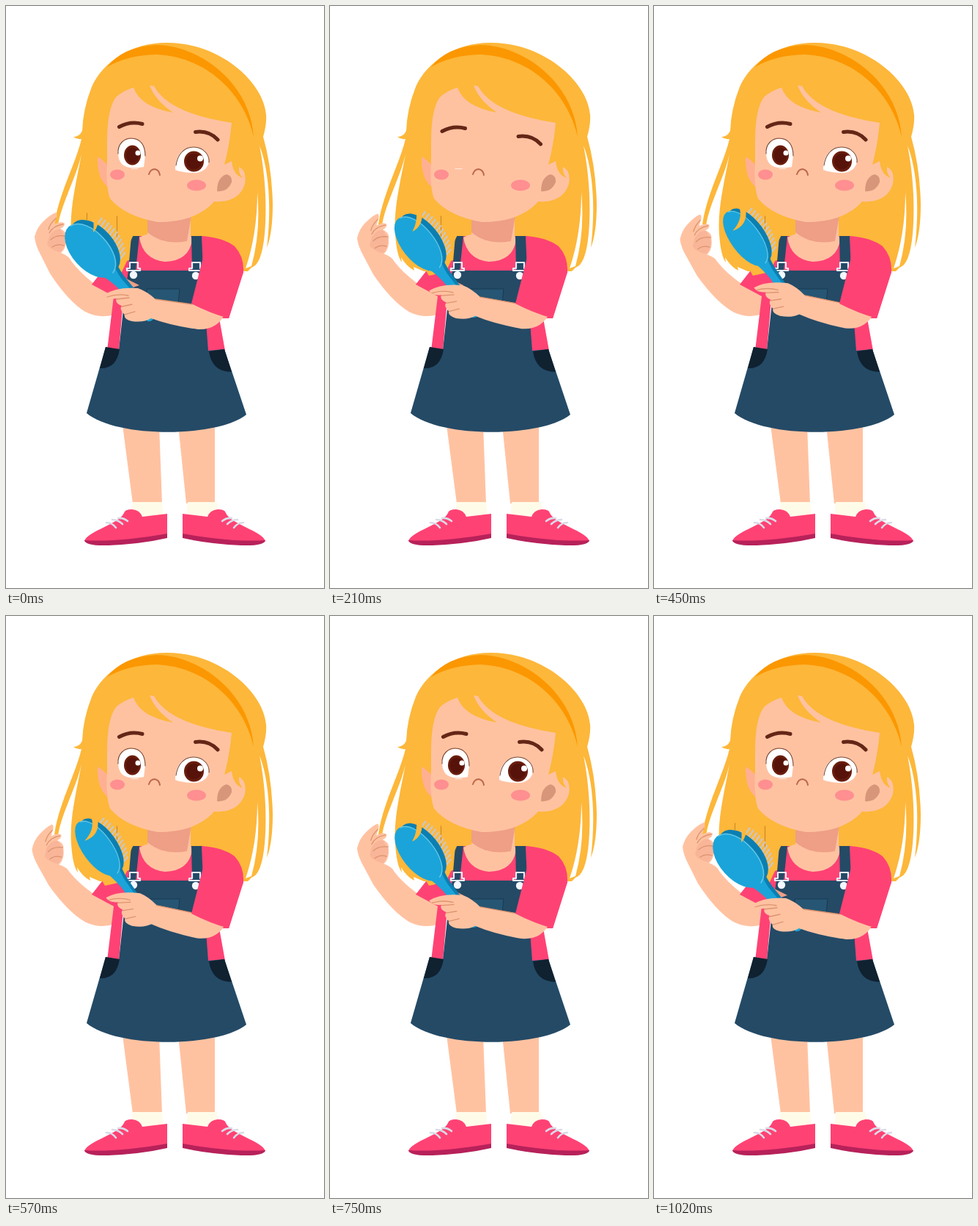
An HTML page that plays this animation: 434 by 792 pixels, repeating every 1050 ms.

```html
<!DOCTYPE html>
<html lang="en">
<head>
<meta charset="utf-8">
<title>Girl brushing her hair</title>
<style>
html, body { margin: 0; height: 100%; overflow: hidden; background: #fff; }
svg { display: block; width: 434px; height: 792px; }
.hair { fill: #fdb73a; }
.band { fill: #fb9700; }
.skin { fill: #ffc2a1; }
.shade { fill: #ee9f86; }
.pink { fill: #ff4274; }
.sole { fill: #b7215a; }
.dress { fill: #244a66; }
.dark { fill: #102130; }
.sock { fill: #fffbe9; }
.blue { fill: #1ba4d9; }
.navy { fill: #0b7fb2; }
.white { fill: #fff; }
.iris { fill: #6a1d0d; }
.pupil { fill: #57130a; }
.cheek { fill: #ff8f90; }
.line { fill: none; stroke-linecap: round; stroke-linejoin: round; }
.crease { stroke: #dc946f; stroke-width: 1.3; }
.brow { stroke: #642616; stroke-width: 5; }
.lid { stroke: #7a4a38; stroke-width: 1.1; }
.buckle { stroke: #e3eefa; stroke-width: 2.2; }
.lace { stroke: #d9dbe8; stroke-width: 2.6; }
</style>
</head>
<body>
<svg viewBox="0 0 434 792">
  <defs>
    <g id="shoe">
      <path class="sock" d="M173 675H213L215 694H170Z"/>
      <path class="pink" d="M220 691L186 695Q183 686 172 685Q162 685 161 690C153 706 112 714 107 728L150 731L220 721Z"/>
      <path class="sole" d="M107 727Q150 730 220 718V724Q185 732 140 734Q108 735 107 727Z"/>
      <path class="line lace" d="M153 697Q160 696 166 701M145 699Q153 699 159 705M137 703Q145 703 150 710"/>
    </g>
  </defs>

  <!-- back hair and loose strands -->
  <path class="hair" d="M218 50C172 50 132 76 117 110Q105 140 104 170Q100 178 92 178Q97 182 103 181C95 215 72 255 66 297L71 298C77 262 102 225 106 184C100 225 86 270 89 310Q91 340 98 349L97 342Q105 355 115 360L114 355L128 361H330L335 356Q349 352 353 310C357 265 352 220 346 190C358 220 363 270 356 329Q364 308 364 270Q363 220 351 178Q356 160 355 148C352 104 292 49 218 50Z"/>
  <path class="white" d="M343 253Q343 310 327 357L335 354Q348 307 343 253Z"/>

  <g id="leftArm">
    <path class="skin" d="M47 338Q40 325 39 314Q42 302 50 294Q60 284 68 281Q71 284 68 290L66 297Q76 292 80 296Q80 301 74 303Q83 307 82 314Q83 326 78 333L75 336Q86 340 89 347Q100 362 118 376L150 388L147 420Q128 426 108 416Q85 402 60 364Z"/>
    <path class="shade" opacity=".35" d="M59 313Q66 302 75 304L81 315Q82 327 74 335Q60 332 56 324Z"/>
    <path class="line crease" d="M68 289Q60 296 58 304M78 297Q64 299 59 309M81 313Q68 311 61 318M79 326Q70 323 63 328"/>
  </g>

  <path class="skin" d="M159 570H209L213 677H173ZM235 570H285V677H246Z"/>
  <use href="#shoe"/>
  <use href="#shoe" transform="matrix(-1 0 0 1 461 0)"/>

  <!-- shirt, neck and dress -->
  <path class="pink" d="M180 313H268Q296 315 312 327Q325 341 324 362L304 425H291L299 469H276L240 400L160 400L154 469H138L147 395L117 379L131 361L170 345Z"/>
  <path class="skin" d="M192 285H252V312L254 318Q250 347 217 348Q187 345 182 315L192 310Z"/>
  <path class="shade" d="M192 285H253L247 320Q215 326 193 308Z"/>
  <path class="dress" d="M171 313H182L177 360H254L253 313H267L269 360Q266 400 273 430L276 469L298 467L328 556C288 588 150 588 110 554L136 464L154 468L162 395L167 360Z"/>
  <path fill="#265673" stroke="#193a52" d="M192 385H237L235 404Q215 412 193 405Z"/>
  <path class="dark" d="M136 464L155 467Q151 494 128 493ZM277 470L298 467L308 498Q281 498 277 470Z"/>
  <path class="hair" d="M120 250H184L178 303L170 320L166 345L158 362L135 367L128 355Z"/>
  <path class="line buckle" d="M169 349V357H165V360H183V357H180V349ZM254 349V357H250V360H268V357H265V349Z"/>
  <g fill="#f3f8ff"><circle cx="174" cy="366" r="5.2"/><circle cx="259" cy="367" r="5.2"/></g>

  <!-- head -->
  <path class="hair" d="M183 288H193V311L183 312Z"/>
  <path class="band" d="M138 83Q160 55 205 53C262 53 333 103 338 178C325 120 275 69 205 66Q165 67 138 83Z"/>
  <path fill="#ffb092" d="M125 205Q124 236 140 247L143 240V222Q133 209 125 205Z"/>
  <path class="skin" d="M138 185Q138 140 150 124Q160 115 174 111Q183 137 228 145Q204 129 196 108L202 109Q222 146 308 159Q305 190 298 216L308 211Q310 230 323 234Q317 228 318 219Q329 224 326 242Q318 268 284 266C265 288 235 294 207 294Q162 286 142 262Q136 247 138 210Z"/>
  <path fill="#d7967a" d="M288 252Q288 233 301 229Q309 231 308 240Q302 254 288 252Z"/>
  <ellipse class="cheek" cx="152" cy="229.500" rx="10" ry="7"/>
  <ellipse class="cheek" cx="260" cy="244" rx="13" ry="7.500"/>
  <path class="line" stroke="#bb6a4b" stroke-width="2" d="M195 229Q197 222 203 222Q209 223 210 230"/>
  <path class="line" stroke="#ffeadf" d="M171 221.500H180"/>
  <g class="eye" data-y="221">
    <path class="white" d="M153 200C152 187 162 181 171 181C184 181 190 191 190 204L188 219Q166 223 158 215Q153 209 153 200Z"/>
    <path class="line lid" d="M153 201C152 187 162 180 171 180C184 180 190 190 190 204"/>
    <ellipse class="iris" cx="172.500" cy="203" rx="11.500" ry="13.500"/>
    <ellipse class="pupil" cx="172.500" cy="203" rx="9" ry="10.500"/>
    <circle class="white" cx="180" cy="200" r="3.500"/>
  </g>
  <g class="eye" data-y="227">
    <path class="white" d="M231 223C231 204 240 192 256 192C270 192 278 203 277 212C275 223 265 228 253 227Q238 226 231 223Z"/>
    <path class="line lid" d="M232 217C234 203 242 192 256 192C270 192 278 203 277 213"/>
    <ellipse class="iris" cx="256.500" cy="211.500" rx="13.500" ry="14"/>
    <ellipse class="pupil" cx="256.500" cy="211.500" rx="10.500" ry="11"/>
    <circle class="white" cx="265" cy="207.500" r="4"/>
  </g>
  <path id="brows" class="line brow" d="M154.500 164.500Q170 156 186 160.500M258.500 171.500Q277 169 289 182"/>

  <path class="line" stroke="#c98322" d="M151.500 286V318M110.500 282V291"/>
  <path class="shade" d="M160 369L182 380L168 385Z"/>

  <g id="brush">
    <path id="bristles" class="line" stroke="#cfc6bb" stroke-width="2.6"/>
    <path class="navy" d="M34 -16Q50 -11 62 -11L125 -8V3H36Z"/>
    <ellipse class="navy" cy="-9" rx="43" ry="25"/>
    <path class="blue" d="M36 -11Q50 -6 62 -6L124 -5Q130 0 124 6L62 6Q50 7 36 11Z"/>
    <ellipse class="blue" rx="44" ry="25"/>
    <path class="line" stroke="#62c7e8" stroke-width="1.5" d="M-43 -3C-37 -32 37 -32 43 -3"/>
  </g>
  <path id="lock" class="hair"/>

  <g id="rightArm">
    <path class="skin" d="M134 393Q150 382 180 384Q192 388 204 399L256 406L300 416Q290 441 262 440Q225 435 198 425Q188 431 172 429Q160 426 162 420Q154 413 158 408Q148 404 151 398Q139 400 134 393Z"/>
    <path class="line crease" d="M138 396Q152 391 167 394M151 399L168 397M158 409L172 406M162 420L176 416M204 399L254 406"/>
  </g>
  <path class="pink" d="M269 342L253 405Q278 418 304 425L324 362Q322 335 300 330Z"/>
</svg>
<script>
const LOOP = 1050, PEAK = 525, REST = 1020;
const $ = id => document.getElementById(id);
const ease = u => (1 - Math.cos(Math.PI * u)) / 2;
const clamp = u => Math.max(0, Math.min(1, u));

let bristles = '';
for (let x = -26; x <= 36; x += 5.6) {
  const y = -9 - 25 * Math.sqrt(1 - (x / 43) ** 2);
  bristles += `M${x} ${y}L${x - 2} ${y - 10}`;
}
$('bristles').setAttribute('d', bristles);

const move = (id, value) => $(id).setAttribute('transform', value);

// 0 = brush low, 1 = brush raised
const lift = t => t < PEAK
  ? ease((t / PEAK) ** 0.7)
  : 1 - ease(clamp((t - PEAK) / (REST - PEAK)));

// 0 = eyes open, 1 = closed
const blink = t => clamp((105 - Math.abs(t - 210)) / 75);

function draw(t) {
  const p = lift(t), shut = blink(t);
  move('leftArm', `rotate(${-2.5 * p} 125 400)`);
  move('rightArm', `rotate(${3.8 * p} 285 425)`);
  // the brush also turns slightly edge-on as it rises
  move('brush', `translate(${115 + 10 * p} ${333 - 17 * p}) rotate(${48 + 6 * p}) scale(1 ${1 - 0.2 * p})`);
  const tip = `${119 - 12 * p} ${308 - 2 * p}`;
  $('lock').setAttribute('d', `M117 276Q121 291 ${tip}Q129 299 125 275Z`);

  move('brows', `translate(${-1.5 * shut} ${6 * shut})`);
  for (const eye of document.querySelectorAll('.eye')) {
    const y = eye.dataset.y;
    eye.setAttribute('transform', `translate(0 ${y * shut}) scale(1 ${1 - shut})`);
    eye.style.display = shut === 1 ? 'none' : '';
  }
}

const start = performance.now();
function tick() {
  draw((performance.now() - start) % LOOP);
  requestAnimationFrame(tick);
}
tick();
</script>
</body>
</html>
```
